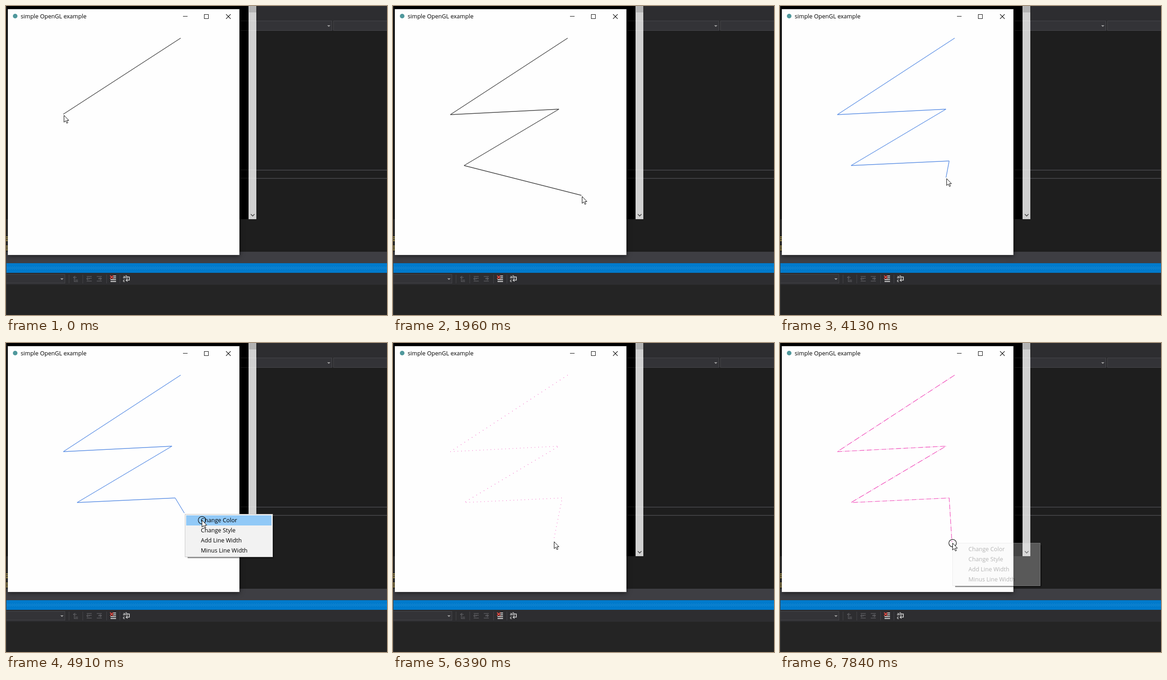
These frames come from a looping animation (831x674 px, 8000 ms). An HTML page with a canvas:

```html
<!DOCTYPE html>
<html lang="en">
<head>
<meta charset="utf-8">
<title>simple OpenGL example</title>
<style>
html, body { margin: 0; width: 100%; height: 100%; overflow: hidden; background: #1e1e1e; }
canvas { position: absolute; left: 0; top: 0; width: 831px; height: 674px; }
</style>
</head>
<body>
<canvas id="desk" width="831" height="674"></canvas>
<canvas id="scene" width="831" height="674"></canvas>
<script>
const LOOP = 8000;
const FLASH = 130; // click ring, menu fade and menu closing
const PAUSE = 140; // pointer rest before and after each stop
const FONT = '12.6px "Open Sans", "Noto Sans", sans-serif';
const ITEMS = ['Change Color', 'Change Style', 'Add Line Width', 'Minus Line Width'];
const ROW = 22.3;
const COLORS = ['#404040', '#5a8ee4', '#f25cc0'];
const STIPPLES = [[], [1, 7], [11, 2, 1, 2]];

const context = id => document.getElementById(id).getContext('2d');
const desk = context('desk');
const scene = context('scene');

const stop = action => (at, x, y) => ({ at, action, x, y });
const move = stop('move'), vertex = stop('vertex'), open = stop('open');
const pick = (at, row) => ({ at, action: 'pick', row });

const story = [
  vertex(-1, 381, 70), move(0, 126, 238), vertex(120, 125, 237), vertex(1100, 362, 225),
  vertex(1660, 155, 348), move(1960, 412, 415), vertex(2780, 369, 338),
  open(3320, 293, 367), pick(3860, 0),
  open(4385, 390, 373), pick(4910, 0),
  open(5434, 298, 399), move(5840, 343, 453), pick(6097, 1),
  open(6647, 362, 432), move(6940, 387, 441), pick(7190, 1),
  open(7840, 376, 436), move(LOOP, 376, 436)];

// A pick lands on its row and closes the menu opened before it.
let opened;
for (const s of story) {
  if (s.action === 'open') {
    opened = s;
    s.close = LOOP;
  } else if (s.action === 'pick') {
    s.x = opened.x + 37;
    s.y = opened.y + 13 + s.row * ROW;
    opened.close = s.at + FLASH;
  }
}
const clicks = story.filter(s => s.action !== 'move');

function box(c, color, x, y, w, h) {
  c.fillStyle = color;
  c.fillRect(x, y, w, h);
}

function frame(c, color, x, y, w, h) {
  c.strokeStyle = color;
  c.lineWidth = 1;
  c.strokeRect(x + .5, y + .5, w - 1, h - 1);
}

function stroke(c, color, width, ...lines) {
  c.strokeStyle = color;
  c.lineWidth = width;
  c.beginPath();
  for (const line of lines) line.forEach(([x, y], i) => i ? c.lineTo(x, y) : c.moveTo(x, y));
  c.stroke();
}

function label(c, text, x, y) {
  c.font = FONT;
  c.fillStyle = '#000';
  c.fillText(text, x, y);
}

function combo(x, y, w, h, arrowX) {
  box(desk, '#333337', x, y, w, h);
  frame(desk, '#46464a', x, y, w, h);
  if (!arrowX) return;
  const mid = y + h / 2;
  desk.fillStyle = '#a0a0a0';
  desk.beginPath();
  desk.moveTo(arrowX - 3.5, mid - 1);
  desk.lineTo(arrowX + 3.5, mid - 1);
  desk.lineTo(arrowX, mid + 2.5);
  desk.fill();
}

function drawEditor() {
  box(desk, '#1e1e1e', 0, 0, 831, 674);
  box(desk, '#2d2d30', 547, 0, 284, 54);
  combo(540, 32, 171, 22, 704);
  combo(714, 32, 130, 22);
  for (const y of [357, 375]) box(desk, '#3f3f42', 510, y, 321, 2);
  box(desk, '#3e3e43', 0, 536, 831, 25);
  box(desk, '#007acc', 0, 561, 831, 21);
  for (let row = 0; row < 3; row++)
    for (let x = 2 + row % 2 * 2; x < 831; x += 4) box(desk, '#4aa2dc', x, 569 + row * 2, 1, 1);
  box(desk, '#2d2d30', 0, 582, 831, 27);
  box(desk, '#242424', 0, 608, 831, 66);
  combo(-2, 585, 131, 20, 122);
  for (const x of [137, 167, 219, 248]) box(desk, '#444448', x, 586, 1, 19);
}

function drawToolIcons() {
  const gray = '#5a5a5e', light = '#d0d0d0';
  stroke(desk, gray, 1.4, [[151, 589], [147, 592], [151, 595]], [[147, 592], [154, 592]],
    [[149, 595], [149, 601], [157, 601]], [[151, 598], [157, 598]]);
  for (const [x, dir] of [[181, 1], [203, -1]])
    stroke(desk, gray, 1.4, [[x - 5, 590], [x + 6, 590]], [[x - 1, 594], [x + 6, 594]],
      [[x - 5, 600], [x + 6, 600]], [[x - 5 * dir, 595], [x + 2 * dir, 595]],
      [[x - 2 * dir, 592], [x - 5 * dir, 595], [x - 2 * dir, 598]]);
  for (let i = 0; i < 4; i++) box(desk, light, i < 2 ? 234 : 228, 588 + i * 4, i < 2 ? 6 : 12, 2);
  stroke(desk, '#e04a42', 2, [[227, 588], [234, 595]], [[234, 588], [227, 595]]);
  desk.fillStyle = light;
  desk.font = 'bold 9px "Open Sans", sans-serif';
  desk.fillText('ab', 255, 594);
  desk.fillText('c', 255, 602);
  stroke(desk, light, 1.7, [[265, 591], [269, 591], [269, 598], [262, 598]], [[265, 595], [262, 598], [265, 601]]);
}

function drawConsole() {
  box(desk, '#000', 0, 0, 529, 465);
  box(desk, '#d1d1d1', 529, 0, 17, 465);
  box(desk, '#b2b2b2', 530, 0, 16, 14);
  for (const y of [32, 53, 357, 375]) {
    box(desk, '#1c1c1c', 510, y, 19, 1);
    box(desk, '#dcdcdc', 529, y, 17, 1);
  }
  stroke(desk, '#444', 1.6, [[534, 454], [538, 458], [542, 454]]);
}

function drawWindow() {
  desk.save();
  desk.shadowColor = 'rgba(0,0,0,.6)';
  desk.shadowBlur = 10;
  desk.shadowOffsetY = 2;
  box(desk, '#fefefe', 4, 7, 505, 536);
  desk.restore();
  frame(desk, 'rgba(90,90,90,.35)', 3, 6, 507, 538);
  box(desk, '#3a3a3a', 0, 0, 1, 674);
  for (const y of [507, 527])
    for (let i = -4; i <= 4; i += 4) box(desk, '#c8ae50', 0, y + i, 4, 1.5);
  desk.fillStyle = '#4f989c';
  desk.beginPath();
  desk.arc(20, 22, 5, 0, 7);
  desk.fill();
  label(desk, 'simple OpenGL example', 32, 27);
  box(desk, '#111', 386, 22, 10, 1);
  frame(desk, '#111', 432, 18, 10, 10);
  stroke(desk, '#111', 1.1, [[480, 18], [490, 28]], [[490, 18], [480, 28]]);
}

function pointerAt(t) {
  const i = Math.max(1, story.findIndex(s => s.at >= t));
  const a = story[i - 1], b = story[i];
  const span = b.at - a.at;
  const pause = Math.min(PAUSE, span / 3);
  const k = Math.min(1, Math.max(0, (t - a.at - pause) / (span - 2 * pause)));
  const ease = k * k * (3 - 2 * k);
  return [a.x + (b.x - a.x) * ease, a.y + (b.y - a.y) * ease];
}

// Stipple advances along the longer axis and carries on across vertices.
function drawPolyline(points, color, stipple) {
  const period = stipple.reduce((a, b) => a + b, 0);
  let travelled = 0;
  points.slice(1).forEach(([x, y], i) => {
    const [px, py] = points[i];
    const major = Math.max(Math.abs(x - px), Math.abs(y - py));
    if (!major) return;
    const scale = Math.hypot(x - px, y - py) / major;
    scene.setLineDash(stipple.map(d => d * scale));
    scene.lineDashOffset = period ? travelled % period * scale : 0;
    stroke(scene, color, 1.35, [[px, py], [x, y]]);
    travelled += major;
  });
  scene.setLineDash([]);
}

function drawMenu({ at, x, y }, t, [px, py]) {
  const w = 192, h = 94;
  const fading = t < at + FLASH - 5;
  for (let i = 0; i < 3; i++) {
    const shade = `rgba(0,0,0,${.55 - i * .18})`;
    box(scene, shade, x + w + i, y + 5, 1, h - 5 + i);
    box(scene, shade, x + 6, y + h + i, w - 6 + i, 1);
  }
  scene.globalAlpha = fading ? .28 : 1;
  box(scene, '#f2f2f2', x, y, w, h);
  frame(scene, '#c8c8c8', x, y, w, h);
  const row = Math.floor((py - y - 2.5) / ROW);
  if (!fading && px > x + 2 && row >= 0 && row < ITEMS.length)
    box(scene, '#91c9f7', x + 3, Math.round(y + 2.5 + row * ROW), w - 6, 22);
  ITEMS.forEach((item, i) => label(scene, item, x + 35, Math.round(y + 17.5 + i * ROW)));
  scene.globalAlpha = 1;
}

function drawPointer([x, y], pressed) {
  scene.save();
  scene.translate(Math.round(x) + .5, Math.round(y) + .5);
  if (pressed) {
    scene.strokeStyle = '#111';
    scene.lineWidth = 1.2;
    scene.beginPath();
    scene.arc(0, 0, 8.2, 0, 7);
    scene.stroke();
  }
  const arrow = new Path2D('M0 0V15L3.5 11.8L6 17.2L8.4 16.2L6 11H10.5Z');
  scene.fillStyle = '#fff';
  scene.strokeStyle = '#000';
  scene.lineWidth = 1;
  scene.fill(arrow);
  scene.stroke(arrow);
  scene.restore();
}

function draw(t) {
  const pointer = pointerAt(t);
  const menu = story.find(s => s.action === 'open' && t >= s.at && t < s.close);
  const picks = row => story.filter(s => s.row === row && s.at + FLASH <= t).length;
  const points = story.filter(s => s.action === 'vertex' && s.at <= t).map(s => [s.x, s.y]);
  // The loose end trails the pointer tip slightly and stays put under a menu.
  const [x, y] = menu ? [menu.x, menu.y] : pointer;
  points.push([x - 1, y - 2]);

  scene.clearRect(0, 0, 831, 674);
  drawPolyline(points, COLORS[picks(0)], STIPPLES[picks(1)]);
  if (menu) drawMenu(menu, t, pointer);
  drawPointer(pointer, clicks.some(s => s.at >= 0 && t >= s.at && t < s.at + FLASH));
}

drawEditor();
drawToolIcons();
drawConsole();
drawWindow();

const begin = performance.now();
function tick() {
  draw((performance.now() - begin) % LOOP);
  requestAnimationFrame(tick);
}
tick();
</script>
</body>
</html>
```
